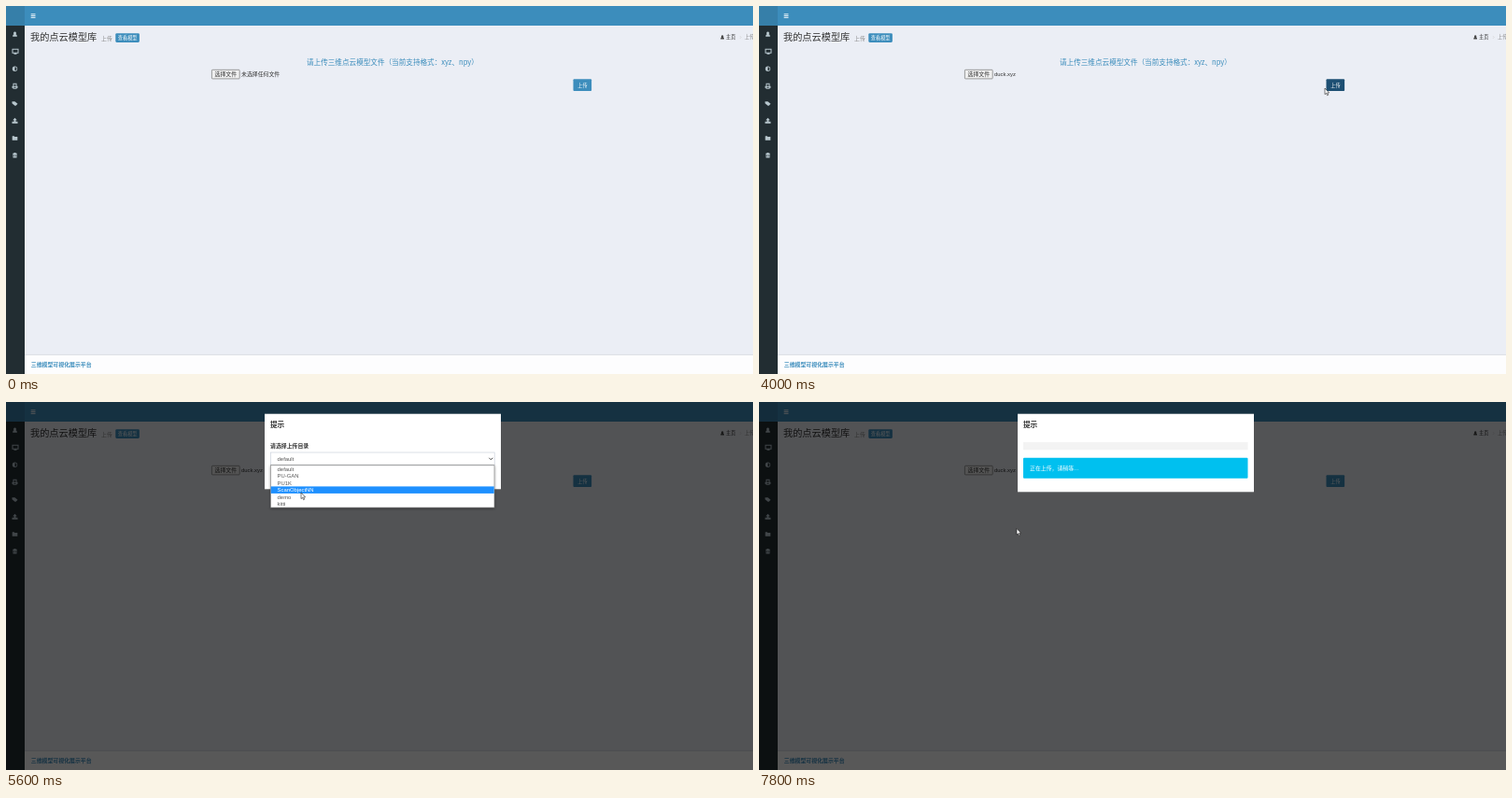
Write an HTML page that moves like this. It is 800 px wide and 394 px high and loops after 8000 ms.

```html
<!DOCTYPE html>
<html lang="zh-CN">
<head>
<meta charset="utf-8">
<title>点云模型上传</title>
<style>
  html, body { margin: 0; width: 100%; height: 100%; overflow: hidden; background: #ebeef5; }
  svg { display: block; width: 100%; height: 100%; }
  text { font: 5.9px "Liberation Sans", "Noto Sans CJK SC", "Noto Sans CJK", sans-serif; fill: #333; white-space: pre; }
  .cjk { font-family: "Noto Sans CJK SC", "Noto Sans CJK", sans-serif; }
  .bold { font-weight: 700; }
  .small { font-size: 5.2px; }
  .title { font-size: 10.2px; }
  .prompt, .head { font-size: 7.6px; }
  .blue { fill: #3c8dbc; }
  .white { fill: #fff; }
  .gray { fill: #888; }
  .option { fill: #555; }
  .copy { fill: #1d4f91; }
  .button { fill: #3c8dbc; }
  .button.pressed { fill: #1d4f73; }
</style>
</head>
<body>
<svg viewBox="0 0 800 394" preserveAspectRatio="none">
  <defs>
    <filter id="shadow" x="-5%" y="-20%" width="110%" height="150%">
      <feDropShadow dx="0" dy="1" stdDeviation="1.5" flood-opacity=".4"/>
    </filter>
  </defs>

  <rect width="800" height="394" fill="#ebeef5"/>
  <rect width="800" height="21" fill="#3c8dbc"/>
  <rect width="20" height="21" fill="#367fa9"/>
  <rect y="21" width="20" height="373" fill="#222d32"/>
  <rect x="20" y="373" width="780" height="21" fill="#fdfdfe"/>
  <path d="M20 373.4h780" stroke="#d2d6de" stroke-width=".8"/>
  <path d="M26.7 10.6h4.8" stroke="#fff" stroke-width="4.5" stroke-dasharray="none" opacity="0"/>
  <path d="M26.7 8.8h4.8m-4.8 1.8h4.8m-4.8 1.8h4.8" stroke="#fff" stroke-width=".9"/>
  <g id="sidebar" fill="#b8c7ce" fill-rule="evenodd"></g>

  <text class="cjk title" x="26" y="37.1">我的点云模型库</text>
  <text class="cjk gray" x="102" y="36.6">上传</text>
  <rect class="button" x="117.3" y="29.3" width="25.6" height="9.6" rx="1.3"/>
  <text class="cjk small white" x="119.8" y="36.1">查看模型</text>
  <path id="homeIcon" transform="translate(767.2 33.4) scale(.8)" fill="#444"/>
  <text class="cjk small" x="771" y="35.3">主页</text>
  <path d="M786 32.2l1.2 1.3-1.2 1.3" fill="none" stroke="#ccc" stroke-width=".6"/>
  <text class="cjk small gray" x="791" y="35.3">上传</text>

  <text class="cjk prompt blue" x="322" y="62.5">请上传三维点云模型文件（当前支持格式：xyz、npy）</text>
  <rect x="220.4" y="68.3" width="29.8" height="9.6" rx=".8" fill="#efefef" stroke="#767676" stroke-width=".7"/>
  <text class="cjk" x="223.5" y="75.3">选择文件</text>
  <text id="fileName" x="252" y="75.3"></text>
  <rect id="upload" class="button" x="607.5" y="78.2" width="19.6" height="12.7" rx="1"/>
  <text class="cjk small white" x="612.2" y="86.5">上传</text>
  <text class="cjk bold blue" x="26.8" y="386">三维模型可视化展示平台</text>

  <rect id="backdrop" width="800" height="394"/>

  <g id="chooser">
    <rect x="277" y="12.7" width="253" height="80.6" fill="#fff"/>
    <text class="cjk head bold" x="283" y="26.9">提示</text>
    <text class="cjk bold" x="283" y="49.2">请选择上传目录</text>
    <rect x="283.4" y="54" width="239.8" height="13.4" fill="#fff" stroke="#ccd2dc" stroke-width=".7"/>
    <text id="choice" class="option" x="290.6" y="62.8"></text>
    <path d="M517.4 59.8l1.9 2 1.9-2" fill="none" stroke="#333" stroke-width=".9"/>
    <rect class="button" x="483" y="74.3" width="19" height="12.2" rx="1"/>
    <text class="cjk small white" x="487.3" y="82.3">确定</text>
    <rect x="504.3" y="74.5" width="18.6" height="11.8" rx="1" fill="#f4f4f4"/>
    <text class="cjk small" x="508.3" y="82.3">取消</text>
  </g>

  <g id="progress">
    <rect x="277" y="12.7" width="253" height="83.6" fill="#fff"/>
    <text class="cjk head bold" x="283" y="26.9">提示</text>
    <rect x="283" y="43" width="240.5" height="8.3" fill="#f3f3f3"/>
    <rect x="283" y="59.7" width="240.5" height="22" rx="1" fill="#00c0ef"/>
    <text class="white" x="290" y="73">正在上传，请稍等...</text>
  </g>

  <g id="menu">
    <rect x="283.4" y="67.8" width="239.6" height="45.2" fill="#fff" stroke="#767676" stroke-width=".6" filter="url(#shadow)"/>
    <rect id="highlight" x="283.7" width="239" height="7.5" fill="#1e90ff"/>
  </g>

  <g id="drag">
    <circle cx="2" cy="-4.7" r="10.4" fill="#858585" opacity=".85"/>
    <text class="gray" x="-9" y="13.4">duck.xyz</text>
    <rect x="4.7" y="7.3" width="21.4" height="8.3" fill="#fff" stroke="#888" stroke-width=".6"/>
    <path d="M6.8 11.5h4.4M9 9.3v4.4" stroke="#1d4f91" stroke-width="1.1"/>
    <text class="cjk small copy" x="13" y="13.5">复制</text>
  </g>
  <path id="cursor" d="M0 0V6.6L1.5 5.3 2.6 7.7 3.7 7.2 2.6 4.9H4.6Z" fill="#fff" stroke="#111" stroke-width=".55"/>
</svg>

<script>
const LOOP = 8000, STEP = 200, ROW = 7.5, MENU_TOP = 67.9, MAX_DIM = .65;
const DROP = 1800, MENU_OPEN = 5200, PICK = 6000;
const folders = ['default', 'PU-GAN', 'PU1K', 'ScanObjectNN', 'demo', 'kitti'];
const icons = {
  user: 'M0-2.7a1.5 1.5 0 0 1 1 2.6q1.4.4 1.4 2.6h-4.8q0-2.2 1.4-2.6a1.5 1.5 0 0 1 1-2.6z',
  screen: 'M-3-3h7v5h-7zM-2-2v3h5v-3zM-1 2h3v1h-3z',
  contrast: 'M0-2.7a2.7 2.7 0 0 1 0 5.4a2.7 2.7 0 0 1 0-5.4zM0-2v4a2 2 0 0 0 0-4z',
  printer: 'M-2-3h4v3h1v2h-1v1h-4v-1h-1v-2h1zM-1-2v2h2v-2zM-1 1v1h2v-1z',
  tags: 'M-3-2h3l3 2.5-2 2h-1l-3-2.5z',
  upload: 'M0-3l2.3 2.5h-1.4v1.5h-1.8v-1.5h-1.4zM-3 1h6v2h-6z',
  folder: 'M-2.8-2h2l.6.7h3v3.8h-5.6z',
  trash: 'M-2.4-2h1.4v-.8h2v.8h1.4v.7h-.4v4h-4v-4h-.4zM-1-.5v2h.6v-2zM.4-.5v2h.6v-2z'
};
// Eased pointer moves; the pointer rests between them.
const moves = [
  { from: 600, to: 1400, x: 252, y: 74.5 },
  { from: DROP, to: 3000, x: 598, y: 95 },
  { from: 3000, to: 3400, x: 606, y: 88 },
  { from: 4400, to: MENU_OPEN, x: 322, y: 61 },
  { from: MENU_OPEN, to: 5600, x: 316, y: 97 },
  { from: 5600, to: 5800, x: 314, y: 101 },
  { from: PICK, to: 6600, x: 492, y: 80 },
  { from: 6800, to: 7400, x: 351.5, y: 132 },
  { from: 7400, to: 7800, x: 276, y: 135.5 }
];
const dialogs = [
  { id: 'chooser', open: 4048, close: 6850, height: 80 },
  { id: 'progress', open: 7223, close: LOOP, height: 84 }
];

const el = id => document.getElementById(id);
const show = (id, on) => el(id).setAttribute('visibility', on ? 'visible' : 'hidden');
const place = (id, x, y) => el(id).setAttribute('transform', `translate(${x} ${y})`);
const ramp = (t, start, length) => Math.min(1, Math.max(0, (t - start) / length));
const smooth = p => p * p * (3 - 2 * p);
const easeOut = p => 1 - (1 - p) ** 3;

function add(parent, tag, attributes) {
  const node = document.createElementNS('http://www.w3.org/2000/svg', tag);
  for (const name in attributes) node.setAttribute(name, attributes[name]);
  return el(parent).appendChild(node);
}

Object.values(icons).forEach((d, i) =>
  add('sidebar', 'path', { d, transform: `translate(9.5 ${30.3 + 18.5 * i})` }));
el('homeIcon').setAttribute('d', icons.user);

const labels = folders.map((name, i) => {
  const label = add('menu', 'text', { x: 290.6, y: MENU_TOP + 5.7 + i * ROW });
  label.textContent = name;
  return label;
});

function pointerAt(t) {
  let x = 780, y = 215;
  for (const move of moves) {
    const p = smooth(ramp(t, move.from, move.to - move.from));
    x += (move.x - x) * p;
    y += (move.y - y) * p;
  }
  return [x, y];
}

// The backdrop leads; the dialog then slides down by a quarter of its height.
function drawDialogs(t) {
  let dim = 0;
  for (const { id, open, close, height } of dialogs) {
    const shown = ramp(t, open + 127, 150) - ramp(t, close, 150);
    el(id).setAttribute('opacity', Math.min(1, 1.5 * shown));
    place(id, 0, (shown - 1) * height / 4);
    dim += MAX_DIM * (easeOut(ramp(t, open, 350)) - ramp(t, close, 350));
  }
  el('backdrop').setAttribute('opacity', dim);
}

function draw(t) {
  const [x, y] = pointerAt(t);
  place('cursor', x, y);
  place('drag', x, y);
  show('cursor', t >= moves[0].from);
  show('drag', t >= moves[0].from && t < DROP);

  el('fileName').textContent = t < DROP ? '未选择任何文件' : 'duck.xyz';
  el('choice').textContent = t < PICK ? 'default' : 'demo';
  el('upload').classList.toggle('pressed', t >= 3400 && t < 4400);
  drawDialogs(t);

  const hovered = Math.max(0, Math.floor((y - MENU_TOP) / ROW));
  show('menu', t >= MENU_OPEN && t < PICK);
  el('highlight').setAttribute('y', MENU_TOP + hovered * ROW);
  labels.forEach((label, i) => label.setAttribute('class', i === hovered ? 'white' : 'option'));
}

function tick() {
  draw(Math.floor(performance.now() % LOOP / STEP) * STEP);
  requestAnimationFrame(tick);
}
tick();
</script>
</body>
</html>
```
